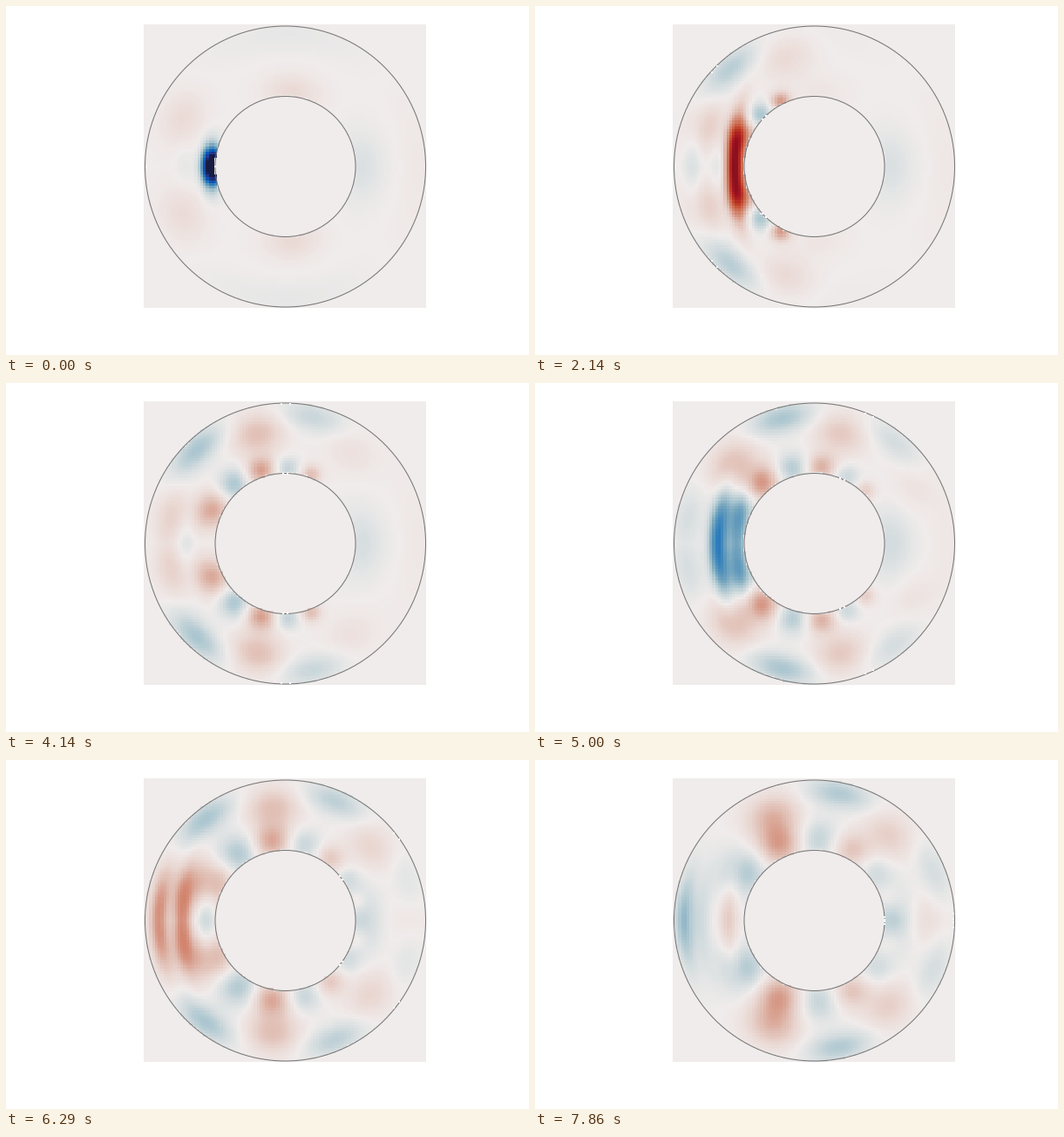
Animation, 600 px wide and 400 px high, one loop 8 s. Source, as a matplotlib script:

```python
import matplotlib.pyplot as plt
import numpy as np
from matplotlib.animation import FuncAnimation
from matplotlib.colors import LinearSegmentedColormap
from matplotlib.patches import Circle

W, H, DPI = 600, 400, 100
FRAMES, LOOP = 56, 8000
CX, CY, R_IN, R_OUT = 320.5, 184, 80.5, 161
LEFT, RIGHT, TOP, BOTTOM = 158, 482, 21, 346
CELLS = 100

COLD = ["#181c43", "#253ea0", "#0a5ebe", "#2477bb", "#4c8ebb", "#77a6be",
        "#a9c5cf", "#d2dbde"]
WARM = ["#f0eceb", "#ead8d3", "#e0bdb2", "#d69683", "#d07a61", "#c85c40",
        "#bd3b24", "#a51422", "#3c0912"]
LEVELS = [0, .1, .2, .3, .4, .5, .6, .75, 1]
stops = [0.5 - v / 2 for v in LEVELS[:0:-1]] + [0.5 + v / 2 for v in LEVELS]
cmap = LinearSegmentedColormap.from_list("wave", list(zip(stops, COLD + WARM)), N=513)

# Cell centres; the field is symmetric about the horizontal axis
cell = (np.arange(CELLS) + 0.5) / CELLS
X, Y = np.meshgrid(LEFT + cell * (RIGHT - LEFT), TOP + cell * (BOTTOM - TOP))
Y = np.abs(Y - CY)
R = np.hypot(X - CX, Y)
ANGLE = np.degrees(np.arctan2(Y, CX - X))  # 0 at the left, 180 at the right
RING = (R > R_IN) & (R < R_OUT)

# Key points of the pulses that bounce between the walls on the left
TIMES = [0, 1.29, 2.05, 3.43, 5, 6.29, 7.86]
PULSES = [  # places, strengths
    ([237, 171, 233, 168, 210, 202, 171], [-1.5, 1.5, .8, .33, -.47, .3, -.24]),
    ([205, 199, 214, 190, 232, 175, 222], [-.03, .08, -.09, -.13, -.28, .3, .15]),
    ([200, 222, 178, 212, 190, 229, 190], [0, -.1, -.08, .18, 0, -.13, -.1]),
]


def gauss(u, v):
    return np.exp(-0.5 * (u * u + v * v))


def polar(angle, rho, depth, length):
    """Blob at an angle and radius, with its length along the circle."""
    return gauss((R - rho) / depth, np.radians(ANGLE - angle) * rho / length)


def crest(age, speed, rho, depth, length):
    """Blob creeping round from the left: it swells, then slowly dies."""
    if age <= 0:
        return 0
    swell = age / 2 * np.exp(1 - age / 2)
    return swell * polar(min(age * speed, 180), rho, depth, length)


def pulses(t):
    length = 38 - 22 * np.exp(-2 * t)
    bend = 0.0024 * (1 - np.exp(-t / 2))
    total = 0
    for places, strengths in PULSES:
        x = np.interp(t, TIMES, places)
        total = total + np.interp(t, TIMES, strengths) * gauss(
            (X - x - bend * Y ** 2) / 7.5, Y / length)
    return total


def inner_train(t):
    total = 0
    for k in range(8):
        start = -0.6 + 0.75 * k + 0.035 * k * k
        power = -0.2 if k % 2 else 0.3
        total = total + power * crest(t - start, 24, 84 + 2 * k, 8 + 1.5 * k, 8 + 2 * k)
    return total


def outer_train(t):
    total = 0
    for k in range(7):
        power = min(0.1 + 0.06 * k, 0.2)
        rho, depth, length = (148, 12, 27) if k % 2 else (130, 17, 22)
        total = total + (-1) ** k * power * crest(
            t + 1 - 1.13 * k, 25 + 1.3 * k, rho, depth, length)
    return total


def background(t):
    fade = np.exp(-t / 2)
    return (0.09 * fade * polar(95, 86, 14, 22)
            - 0.03 * fade * polar(90, 152, 14, 60)
            - (0.07 + 0.1 * (t / 8) ** 3) * polar(180, 88, 17, 28)
            + 0.025 * polar(180, 153, 12, 55))


def field(t):
    total = pulses(t) + inner_train(t) + outer_train(t) + background(t)
    return np.where(RING, total, 0)


def specks(t):
    """Bright specks where the front touches the walls."""
    points = []
    for r in (R_IN, R_OUT - 1):
        for lag in (0, 0.15):
            a = np.radians(23 * max(t - lag, 0))
            points += [(CX - r * np.cos(a), CY + side * r * np.sin(a))
                       for side in (-1, 1)]
    return points


fig = plt.figure(figsize=(W / DPI, H / DPI), dpi=DPI, facecolor="white")
ax = fig.add_axes([0, 0, 1, 1])
ax.axis("off")
image = ax.imshow(field(0), cmap=cmap, vmin=-1, vmax=1, interpolation="nearest",
                  extent=(LEFT, RIGHT, BOTTOM, TOP), aspect="auto")
for r in (R_IN, R_OUT):
    ax.add_patch(Circle((CX, CY), r, fill=False, ec="#777777", lw=0.75))
dots = ax.scatter(*zip(*specks(0)), s=1, marker="s", c="white", lw=0, zorder=3)
ax.set_xlim(0, W)
ax.set_ylim(H, 0)


def update(n):
    t = n * LOOP / FRAMES / 1000
    image.set_data(field(t))
    dots.set_offsets(specks(t))
    return image, dots


anim = FuncAnimation(fig, update, frames=FRAMES, interval=LOOP / FRAMES,
                     repeat=True, repeat_delay=0)
plt.show()
```
